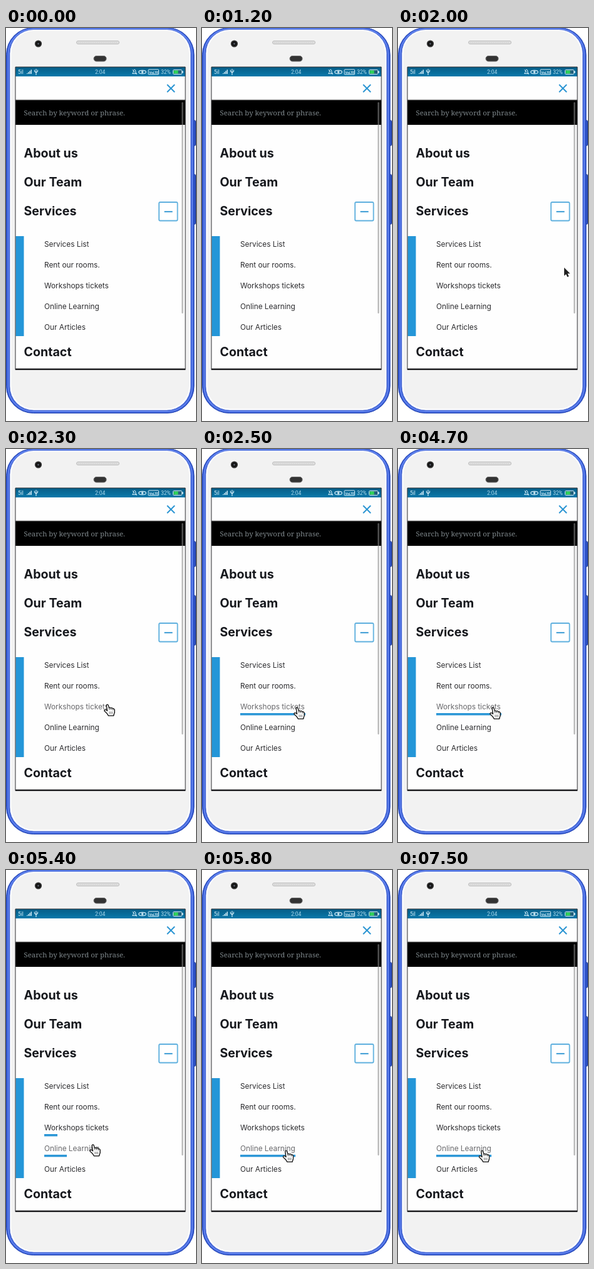
An HTML page with a canvas that plays this animation: 303 px wide and 625 px high, repeating every 8 s.

```html
<!DOCTYPE html>
<html lang="en">
<head>
<meta charset="utf-8">
<title>Mobile menu</title>
<style>
  html, body { margin: 0; width: 100%; height: 100%; overflow: hidden; background: #fff; }
  canvas { display: block; width: 303px; height: 625px; }
</style>
</head>
<body>
<canvas id="stage"></canvas>
<script>
const W = 303, H = 625, LOOP = 8000, STEP = 100;
const BLUE = '#2b95d3';
const canvas = document.getElementById('stage');
const ctx = canvas.getContext('2d');
const ratio = window.devicePixelRatio || 1;
canvas.width = Math.round(W * ratio);
canvas.height = Math.round(H * ratio);

const headings = [['About us', 206], ['Our Team', 252], ['Services', 298], ['Contact', 521.5]];
const links = [
  ['Services List', 347.5], ['Rent our rooms.', 381], ['Workshops tickets', 414],
  ['Online Learning', 446.5], ['Our Articles', 480]
];

// Pointer keys: time, x, y
const pointerPath = [
  [2000, 265, 381], [2100, 226, 393], [2200, 187, 402], [2300, 162, 406],
  [2400, 155, 409], [2500, 152, 411], [5300, 152, 411], [5400, 139, 436.5],
  [5500, 137, 441], [5600, 135, 444], [5800, 134.5, 446]
];
// Underline keys: time, width
const workshopLine = [[2300, 0], [2400, 66], [2500, 104], [5300, 104], [5400, 21], [5500, 0]];
const learningLine = [[5300, 0], [5400, 36], [5500, 74], [5600, 88]];

const handShape = new Path2D('M-1.8 1.6Q-.8-.8 1 1.4L2.4 6Q3.8 4.6 5.2 6Q7 5 8.2 7Q10.4 6.4 11 9V13L9.4 18.2H1.4L-1.2 14.2L-5 10.6Q-5 8-2.4 9L-.4 10.4Z');
const arrowShape = new Path2D('M0 0V13L3 10.4L5.2 15L7.5 14L5.4 9.4H9.5Z');

function sample(keys, t) {
  const next = keys.findIndex(k => k[0] > t);
  if (next === 0) return keys[0].slice(1);
  if (next < 0) return keys[keys.length - 1].slice(1);
  const a = keys[next - 1], b = keys[next];
  const p = (t - a[0]) / (b[0] - a[0]);
  return a.slice(1).map((v, i) => v + (b[i + 1] - v) * p);
}

function rect(x, y, w, h, color) {
  ctx.fillStyle = color;
  ctx.fillRect(x, y, w, h);
}

function round(x, y, w, h, r, fill, stroke, width = 1) {
  ctx.beginPath();
  ctx.roundRect(x, y, w, h, r);
  if (fill) { ctx.fillStyle = fill; ctx.fill(); }
  if (stroke) { ctx.strokeStyle = stroke; ctx.lineWidth = width; ctx.stroke(); }
}

function dot(x, y, r, color) {
  ctx.beginPath();
  ctx.arc(x, y, r, 0, Math.PI * 2);
  ctx.fillStyle = color;
  ctx.fill();
}

function line(points, color, width) {
  ctx.beginPath();
  points.forEach(([x, y], i) => i ? ctx.lineTo(x, y) : ctx.moveTo(x, y));
  ctx.strokeStyle = color;
  ctx.lineWidth = width;
  ctx.stroke();
}

function text(str, x, y, font, color) {
  ctx.font = font;
  ctx.fillStyle = color;
  ctx.fillText(str, x, y);
}

function drawPhone() {
  rect(0, 0, W, H, '#fff');
  round(298, 147, 4.5, 40, 1.5, '#3158cf', '#1c3384');
  round(298, 233, 4.5, 79, 1.5, '#3158cf', '#1c3384');
  round(0.5, -0.5, 299.5, 613, 43, '#3357cf', '#2546b4');
  round(3.5, 1.5, 293.5, 608.5, 40, null, '#5f82ee', 2);
  round(6, 2.5, 288.5, 605.5, 38, '#fff', '#6b86dc', 0.8);
  round(8.5, 4.5, 283.5, 601, 36, '#f2f2f2');

  round(112.5, 20.5, 68, 5, 2.5, '#dedede', '#bebebe');
  for (let x = 116; x < 179; x += 3) dot(x, 23, 0.6, '#bcbcbc');
  round(140, 44.5, 20, 8.5, 4.2, '#333', '#666');
  dot(51.5, 25, 5.6, '#333');
  dot(51.5, 25, 3.8, '#111');
  dot(51.5, 25, 1.6, '#505560');
}

function drawSignal(x) {
  for (let i = 0; i < 4; i++) rect(x + i * 2.2, 73 - i * 1.9 - 1, 1.4, i * 1.9 + 1, '#d9f0fb');
}

function drawStatus() {
  const pale = '#d3edf9', small = '8.5px "Roboto", sans-serif';
  const g = ctx.createLinearGradient(0, 62, 0, 77);
  g.addColorStop(0, '#075d87');
  g.addColorStop(1, '#0878aa');
  rect(15, 62, 271, 15, g);
  text('5il', 19, 73, small, pale);
  drawSignal(33);
  // USB mark
  line([[45.5, 66.5], [45.5, 69], [48, 71], [50.5, 69], [50.5, 66.5]], pale, 1.1);
  line([[48, 65], [48, 75]], pale, 1.1);
  text('2:04', 142, 73, small, '#a9d7ec');

  // Muted bell and eye
  line([[201.5, 72.5], [203, 70.5], [203.5, 67], [205, 66], [206.5, 67], [207, 70.5], [208.5, 72.5], [201.5, 72.5]], pale, 1);
  line([[201.5, 66], [208.5, 74]], pale, 0.8);
  ctx.beginPath();
  ctx.ellipse(217.5, 70, 5.8, 2.6, 0, 0, Math.PI * 2);
  ctx.strokeStyle = pale;
  ctx.lineWidth = 1.2;
  ctx.stroke();
  dot(217.5, 70, 1.8, pale);

  round(227, 66, 16.5, 8, 1, null, pale);
  text('VoLTE', 228.4, 72.5, 'bold 5.2px "Roboto", sans-serif', pale);
  text('32%', 247, 72.5, small, '#b9e0f0');
  round(266.5, 66.5, 14, 7, 1, '#23617d', pale);
  rect(267.5, 67.5, 7, 5, '#32d65b');
  rect(281, 68.5, 1.6, 3, pale);
}

function drawMenu(t) {
  rect(15, 62, 271, 481, '#fefefe');
  drawStatus();
  line([[257, 90], [269, 102]], BLUE, 2);
  line([[269, 90], [257, 102]], BLUE, 2);
  rect(15, 113, 271, 1.5, '#dcdcdc');
  rect(15, 114.5, 271, 39.5, '#000');
  text('Search by keyword or phrase.', 28.5, 138.5, '11.4px "Noto Serif", serif', '#7d868a');

  for (const [label, y] of headings) text(label, 28.5, y, '700 19.6px "Inter", sans-serif', '#15171c');

  round(244, 277, 29.5, 29.5, 2, '#fff', '#5fb0de', 1.8);
  rect(252.5, 291, 13, 2.2, '#4aa3d8');
  rect(15.5, 331, 13, 159, '#2496d8');

  const hover = t >= 5400 ? 3 : t >= 2300 ? 2 : -1;
  links.forEach(([label, y], i) => {
    text(label, 61, y, '11.8px "Inter", sans-serif', i === hover ? '#68686b' : '#2b2b2e');
  });
  rect(61, 420, sample(workshopLine, t)[0], 3.5, '#2a96d6');
  rect(61, 452.8, sample(learningLine, t)[0], 3.5, '#2a96d6');

  round(280.2, 118, 2.4, 336, 1.2, 'rgba(140,140,140,.6)');
  rect(15, 541.5, 271, 1.8, '#17171b');
  round(15, 62, 271, 481.5, 0, null, '#2b2b2e');
}

function drawPointer(t) {
  if (t < 2000) return;
  const [x, y] = sample(pointerPath, t);
  const hand = t >= 2300;
  ctx.save();
  ctx.translate(x, y);
  ctx.lineJoin = 'round';
  ctx.lineWidth = hand ? 1.3 : 1.6;
  ctx.strokeStyle = hand ? '#222' : '#fff';
  ctx.fillStyle = hand ? '#fff' : '#222';
  const shape = hand ? handShape : arrowShape;
  ctx.stroke(shape);
  ctx.fill(shape);
  if (hand) {
    ctx.stroke(shape);
    line([[2.4, 6], [3, 9]], '#333', 0.9);
    line([[5.2, 6], [5.8, 9]], '#333', 0.9);
    line([[8.2, 7], [8.4, 9.5]], '#333', 0.9);
    for (const k of [3, 5.2, 7.4]) line([[k, 11.5], [k, 15.5]], '#555', 0.8);
  }
  ctx.restore();
}

function frame() {
  const t = Math.floor(performance.now() % LOOP / STEP) * STEP;
  ctx.setTransform(ratio, 0, 0, ratio, 0, 0);
  drawPhone();
  drawMenu(t);
  drawPointer(t);
  requestAnimationFrame(frame);
}
frame();
</script>
</body>
</html>
```
